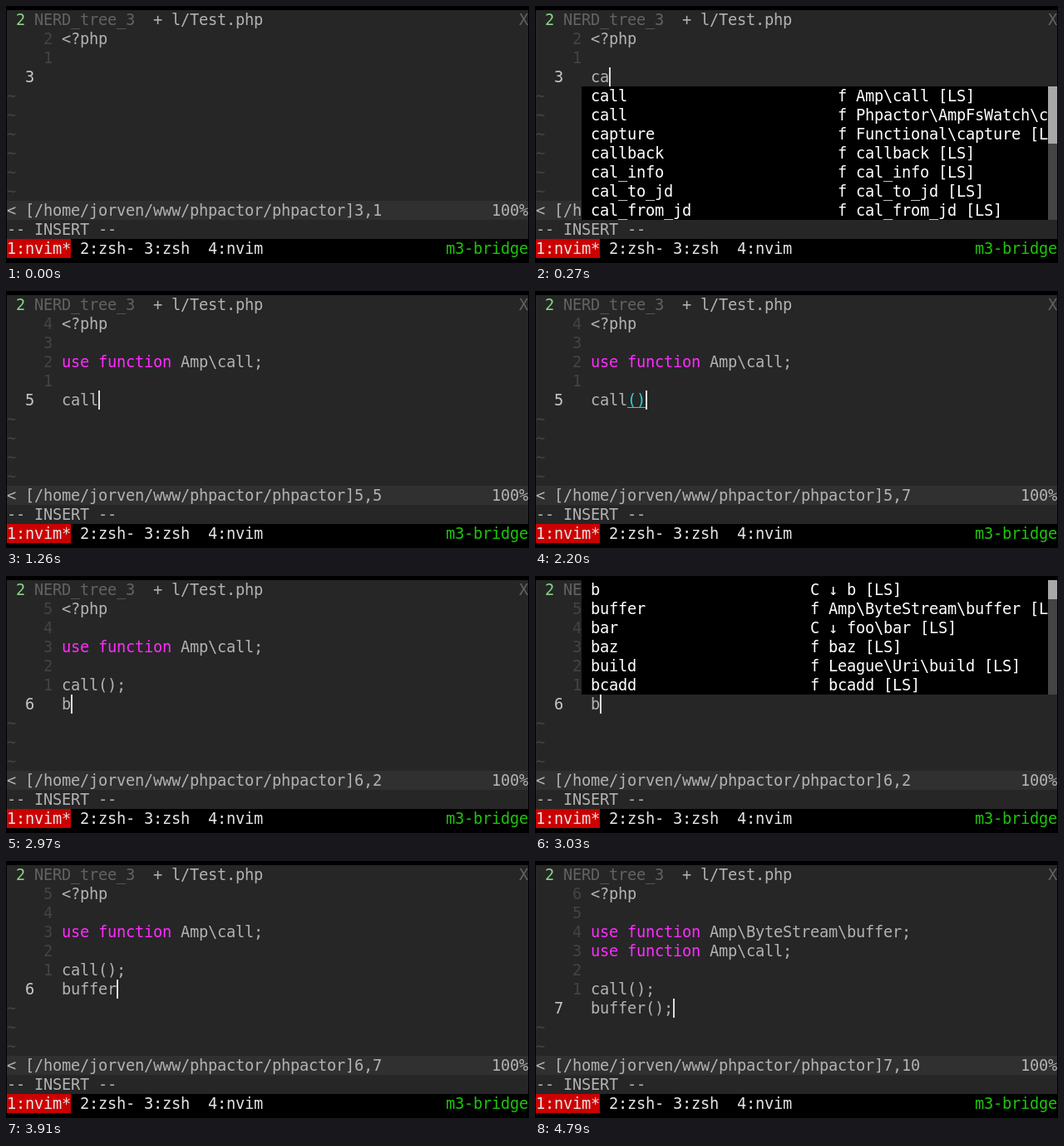
Recreate the animation shown at these times as an HTML page with a canvas. Size 629x310 px, loop 4.89 s.

```html
<!DOCTYPE html>
<html lang="en">
<head>
<meta charset="utf-8">
<title>Editor completion</title>
<style>
  html, body { margin: 0; width: 100%; height: 100%; overflow: hidden; background: #000; }
  canvas { display: block; }
</style>
</head>
<body>
<canvas id="stage" width="629" height="310"></canvas>
<script>
const ctx = document.getElementById('stage').getContext('2d');
const CELL_W = 11, CELL_H = 23, LEFT = 1, TOP = 5, BASELINE = 18;
const COLS = 57, TEXT_COL = 6, STATUS_ROW = 10;
const LOOP = 4890;

const color = {
  back: '#262626', status: '#303030', text: '#b2b2b2', dim: '#444444', tab: '#626262',
  tabNumber: '#87d787', current: '#c6c6c6', keyword: '#ff2cff', match: '#2ad4d4',
  menu: '#000000', menuText: '#ffffff', selected: '#2ad4d4', selectedText: '#08203c',
  track: '#444444', thumb: '#a8a8a8', cursor: '#dddddd',
  active: '#cc0000', window: '#e4e4e4', host: '#1ec40b'
};

// Each item is "word kind detail"; the detail may contain spaces.
const menus = {
  ca: { row: 4, kindCol: 33, thumb: 3, items: [
    'call f Amp\\call', 'call f Phpactor\\AmpFsWatch\\call', 'capture f Functional\\capture',
    'callback f callback', 'cal_info f cal_info', 'cal_to_jd f cal_to_jd', 'cal_from_jd f cal_from_jd'] },
  cal: { row: 4, kindCol: 29, thumb: 4, items: [
    'call f Amp\\call', 'call f Phpactor\\AmpFsWatch\\call', 'callback f callback',
    'cal_info f cal_info', 'cal_to_jd f cal_to_jd', 'cal_from_jd f cal_from_jd',
    'call_user_func f call_user_func'] },
  call: { row: 4, kindCol: 29, items: [
    'call f Amp\\call', 'call f Phpactor\\AmpFsWatch\\call', 'callback f callback',
    'call_user_func f call_user_func', 'call_user_method f call_user_method',
    'call_user_func_array f call_user_func_array',
    'call_user_method_array f call_user_method_array'] },
  b: { row: 0, kindCol: 30, thumb: 1, items: [
    'b C ↓ b', 'buffer f Amp\\ByteStream\\buffer', 'bar C ↓ foo\\bar',
    'baz f baz', 'build f League\\Uri\\build', 'bcadd f bcadd'] },
  bu: { row: 7, kindCol: 13, endCol: 42, items: [
    'buffer f Amp\\ByteStream\\buffer', 'build f League\\Uri\\build'] },
  buf: { row: 7, kindCol: 13, endCol: 42, items: ['buffer f Amp\\ByteStream\\buffer'] }
};

const blank = ['<?php', ''];
const useCall = 'use function Amp\\call;';
const oneUse = [...blank, useCall, ''];
const twoUses = [...blank, 'use function Amp\\ByteStream\\buffer;', useCall, ''];

const steps = [];
function step(at, above, typed, options = {}) {
  steps.push({ at, lines: [...above, typed], ...options });
}

step(0, blank, '', { hideCursor: true });
step(130, blank, 'c');
step(200, blank, 'ca');
step(270, blank, 'ca', { menu: 'ca' });
step(350, blank, 'cal', { menu: 'ca' });
step(410, blank, 'cal', { menu: 'cal' });
step(470, blank, 'call', { menu: 'cal' });
step(530, blank, 'call', { menu: 'call' });
step(850, blank, 'call', { menu: 'call', selected: true });
step(1210, blank, 'call');
step(1260, oneUse, 'call');
step(1770, oneUse, 'call', { hideCursor: true });
step(2020, oneUse, 'call(', { column: 5 });
step(2060, oneUse, 'call(');
step(2200, oneUse, 'call()');
step(2460, oneUse, 'call();');
const called = [...oneUse, 'call();'];
step(2540, called, '');
step(2970, called, 'b');
step(3030, called, 'b', { menu: 'b' });
step(3070, called, 'bu', { menu: 'b' });
step(3130, called, 'bu', { menu: 'bu' });
step(3200, called, 'buf', { menu: 'buf' });
step(3300, called, 'buff', { menu: 'buf' });
step(3600, called, 'buffer', { menu: 'buf', selected: true });
step(3910, called, 'buffer');
const imported = [...twoUses, 'call();'];
step(3960, imported, 'buffer');
step(4420, imported, 'buffer(');
step(4590, imported, 'buffer()');
step(4790, imported, 'buffer();');

const xAt = col => LEFT + col * CELL_W;
const yAt = row => TOP + row * CELL_H;

function fill(col, row, cols, rows, style) {
  ctx.fillStyle = style;
  ctx.fillRect(xAt(col), yAt(row), cols * CELL_W, rows * CELL_H);
}

function write(col, row, text, style, endCol = COLS) {
  ctx.fillStyle = style;
  [...text].slice(0, endCol - col).forEach((char, i) => {
    if (char !== ' ') ctx.fillText(char, xAt(col + i), yAt(row) + BASELINE);
  });
}

function drawFrame() {
  ctx.fillStyle = '#000';
  ctx.fillRect(0, 0, 629, 310);
  fill(0, 0, COLS, 12, color.back);
  write(1, 0, '2', color.tabNumber);
  write(3, 0, 'NERD_tree_3', color.tab);
  write(16, 0, '+ l/Test.php', color.text);
  write(56, 0, 'X', color.tab);
  write(0, 11, '-- INSERT --', color.text);
  fill(0, 12, 7, 1, color.active);
  write(0, 12, '1:nvim* 2:zsh- 3:zsh  4:nvim', color.window);
  write(48, 12, 'm3-bridge', color.host);
}

function drawLines(lines) {
  const last = lines.length - 1;
  lines.forEach((line, i) => {
    const row = i + 1;
    if (i === last) write(2, row, String(lines.length), color.current);
    else write(4, row, String(last - i), color.dim);
    write(TEXT_COL, row, line, color.text);
    if (line.startsWith('use ')) {
      fill(TEXT_COL, row, 12, 1, color.back);
      write(TEXT_COL, row, 'use function', color.keyword);
    }
  });
  for (let row = lines.length + 1; row < STATUS_ROW; row++) write(0, row, '~', color.dim);

  const typed = lines[last];
  if (typed.endsWith('()')) {
    const col = TEXT_COL + typed.length - 2;
    fill(col, last + 1, 2, 1, color.back);
    write(col, last + 1, '()', color.match);
    ctx.fillRect(xAt(col), yAt(last + 1) + 20, 2 * CELL_W, 1);
  }
}

function drawStatus(line, column) {
  fill(0, STATUS_ROW, COLS, 1, color.status);
  write(0, STATUS_ROW, `< [/home/jorven/www/phpactor/phpactor]${line},${column}`, color.text);
  write(53, STATUS_ROW, '100%', color.text);
}

function drawMenu({ row, kindCol, items, thumb, endCol = COLS }, selected) {
  const textEnd = thumb ? COLS - 1 : endCol;
  fill(5, row, endCol - 5, items.length, color.menu);
  if (selected) fill(5, row, endCol - 5, 1, color.selected);
  items.forEach((item, i) => {
    const [word, ...rest] = item.split(' ');
    const style = selected && i === 0 ? color.selectedText : color.menuText;
    write(TEXT_COL, row + i, word, style);
    write(kindCol, row + i, rest.join(' ') + ' [LS]', style, textEnd);
  });
  if (thumb) {
    fill(56, row, 1, items.length, color.track);
    fill(56, row, 1, thumb, color.thumb);
  }
}

function draw({ lines, column, menu, selected, hideCursor }) {
  const typed = lines[lines.length - 1];
  ctx.font = '18.67px "DejaVu Sans Mono", monospace';
  drawFrame();
  drawLines(lines);
  drawStatus(lines.length, column || typed.length + 1);
  if (menu) drawMenu(menus[menu], selected);
  if (!hideCursor) {
    ctx.fillStyle = color.cursor;
    ctx.fillRect(xAt(TEXT_COL + typed.length), yAt(lines.length), 2, CELL_H);
  }
}

const start = performance.now();
let shown;
function tick() {
  const time = (performance.now() - start) % LOOP;
  const current = steps.findLast(s => s.at <= time);
  if (current !== shown) draw(shown = current);
  requestAnimationFrame(tick);
}
tick();
</script>
</body>
</html>
```
